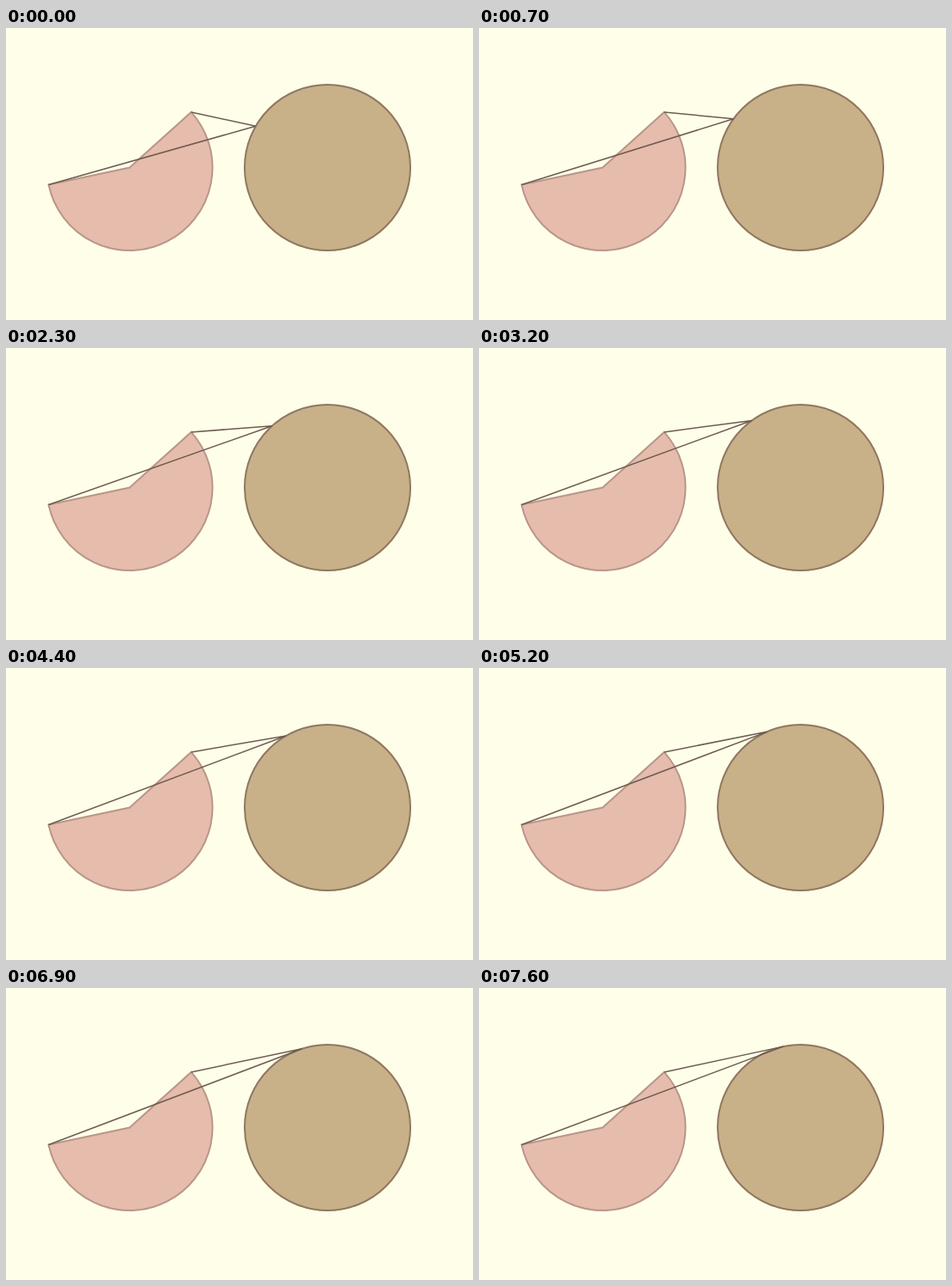
An HTML page for the animation above (8 s loop, 544 by 340 pixels).

```html
<!DOCTYPE html>
<html lang="en">
<head>
<meta charset="utf-8">
<title>Inscribed angle</title>
<style>
  html, body { margin: 0; width: 100%; height: 100%; overflow: hidden; background: #ffffe9; }
  svg { display: block; width: 544px; height: 340px; }
</style>
</head>
<body>
<svg viewBox="0 0 544 340" stroke-width="2">
  <path id="sector" fill="#e6bcac" stroke="#b99689"/>
  <circle id="disc" fill="#c8b088" stroke="#907761"/>
  <polyline id="chords" fill="none" stroke="#6e5c50" stroke-width="1.5"/>
</svg>
<script>
const LOOP = 8000, TICK = 1000, FIRST_TICK = 200;
const R = 96.5, CY = 162.5, LEFT = 144, RIGHT = 374.5;
const el = id => document.getElementById(id);

// Point on a circle centred at x, angle in degrees counterclockwise from the right
function onCircle(x, deg) {
  const a = deg * Math.PI / 180;
  return [x + R * Math.cos(a), CY - R * Math.sin(a)];
}

const top_ = onCircle(LEFT, 42), low = onCircle(LEFT, 192);
el('sector').setAttribute('d', `M${LEFT},${CY} L${top_} A${R},${R} 0 1 1 ${low} Z`);
const disc = el('disc');
disc.setAttribute('cx', RIGHT);
disc.setAttribute('cy', CY);
disc.setAttribute('r', R);

// The vertex jumps six degrees clockwise every second
function draw(now) {
  const t = now % LOOP;
  const step = Math.floor((t - FIRST_TICK) / TICK) + 1;
  const vertex = onCircle(RIGHT, 150 - 6 * step);
  el('chords').setAttribute('points', [top_, vertex, low].join(' '));
}

const start = performance.now();
function frame() {
  draw(performance.now() - start);
  requestAnimationFrame(frame);
}
frame();
</script>
</body>
</html>
```
